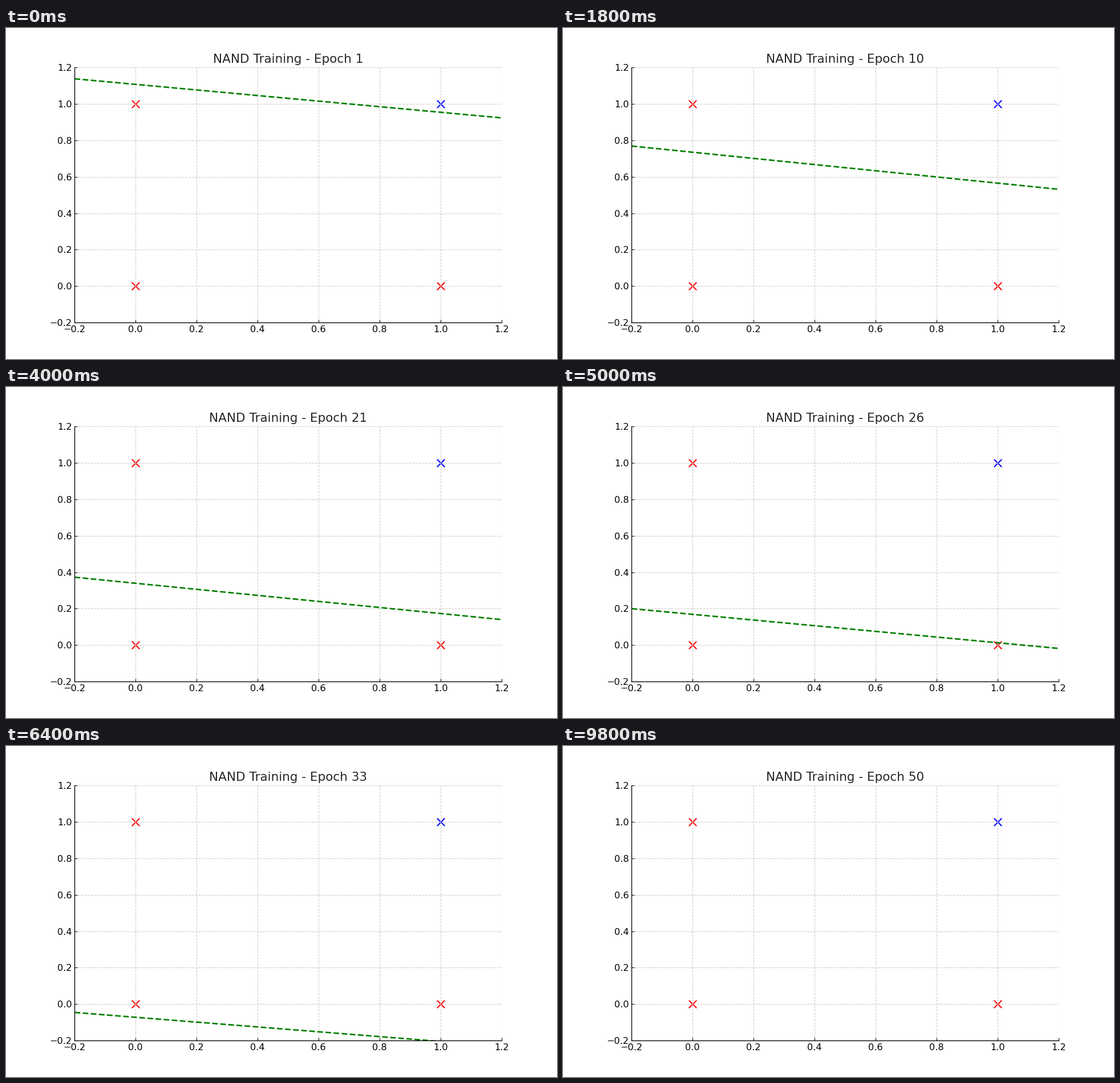
A matplotlib script for the animation above (10 s loop, 966x580 px).

```python
from itertools import product

import matplotlib.pyplot as plt
import numpy as np
from matplotlib.animation import FuncAnimation

W, H, DPI = 966, 580, 100
EPOCHS = 50
K = H / 600  # point sizes are laid out for a stage 600 px high
LOW, HIGH = -0.2, 1.2

plt.rcParams.update({
    "font.family": "DejaVu Sans",
    "font.size": 12 * K,
    "axes.linewidth": K,
    "axes.spines.top": False,
    "axes.spines.right": False,
})


def edge_heights(epoch):
    """Height of the decision boundary at the left and right edge."""
    t = epoch - 24
    left = 0.269 - 0.0345 * t - 6.25e-6 * t ** 3
    drop = 0.240 - 1.5e-4 * (epoch - 14) ** 2
    return left, left - drop


fig, ax = plt.subplots(figsize=(W / DPI, H / DPI), dpi=DPI, facecolor="white")
fig.subplots_adjust(left=0.125 - 0.5 / W, right=0.9 - 0.5 / W,
                    bottom=0.11 + 0.2 / H, top=0.88 + 0.2 / H)

ticks = np.linspace(LOW, HIGH, 8).round(1)
ax.set(xlim=(LOW, HIGH), ylim=(LOW, HIGH), xticks=ticks, yticks=ticks)
ax.tick_params(direction="in", length=3.5 * K, width=0.8 * K, pad=3.5 * K)
ax.grid(True, linestyle="--", linewidth=0.8 * K, color="#cccccc")

for x, y in product((0, 1), repeat=2):
    ax.scatter(x, y, s=100 * K ** 2, marker="x", linewidths=1.5 * K,
               color="blue" if x and y else "red")

boundary, = ax.plot([], [], "--", color="green", linewidth=2 * K)
title = ax.set_title("", fontsize=16 * K, color="#262626", pad=6 * K)


def draw(frame):
    epoch = frame + 1
    boundary.set_data((LOW, HIGH), edge_heights(epoch))
    title.set_text(f"NAND Training - Epoch {epoch}")
    return boundary, title


anim = FuncAnimation(fig, draw, frames=EPOCHS, interval=200,
                     init_func=lambda: draw(0), repeat=True, repeat_delay=0)
plt.show()
```
